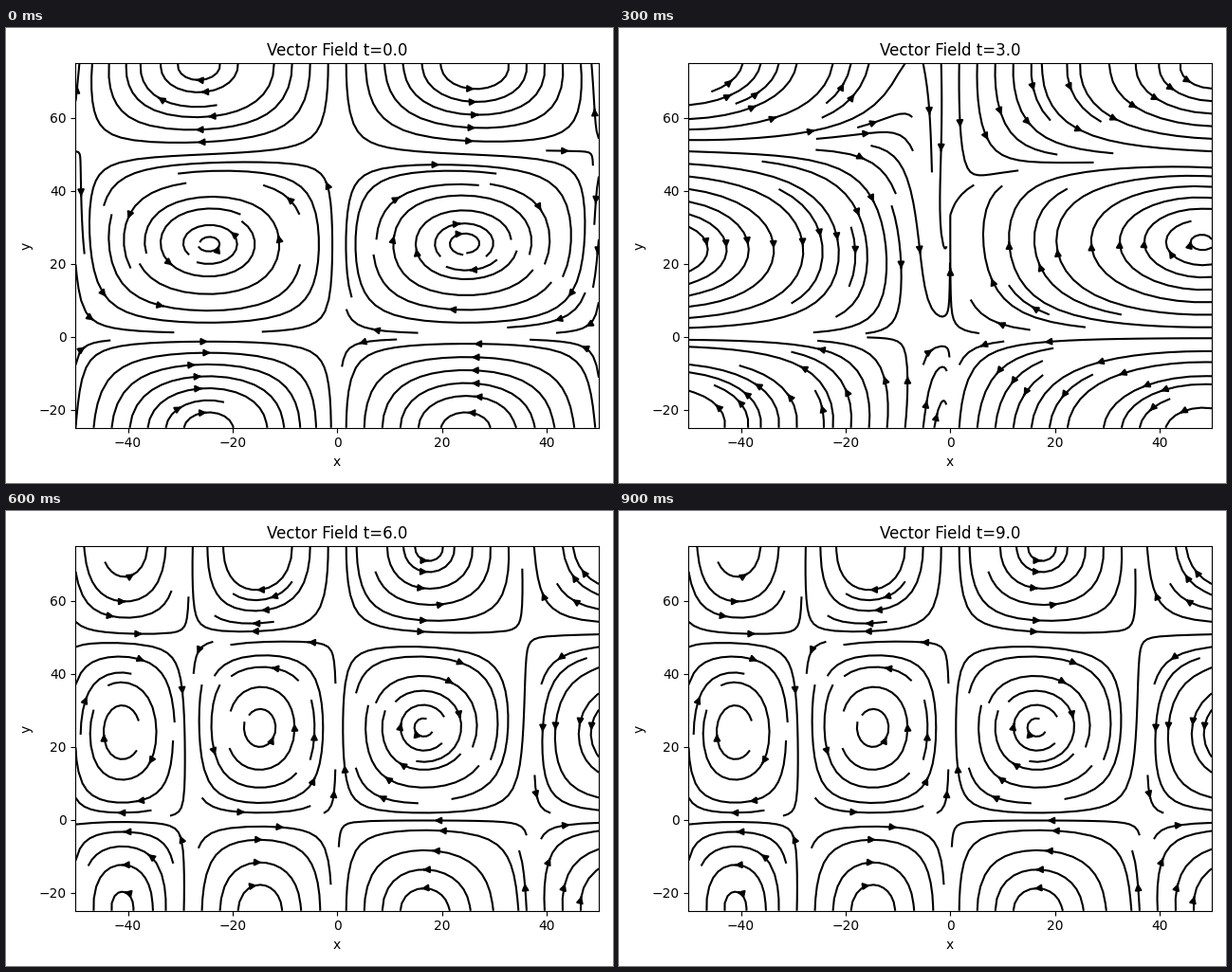
Write a matplotlib script that moves like this. It is 640 by 480 pixels and loops after 1000 ms.

```python
import numpy as np
import matplotlib.pyplot as plt
from matplotlib.animation import FuncAnimation

# Damped, time-periodic double gyre
SIZE = 50.0
AMPLITUDE = 0.5
DAMPING = 0.002
EPSILON = 0.5
PERIOD = 10
FRAMES = 10

X, Y = np.meshgrid(np.linspace(-50, 50, 101), np.linspace(-25, 75, 101))


def velocity(x, y, t):
    sway = EPSILON * np.sin(2 * np.pi * t / PERIOD)
    xs, ys = x / SIZE, np.pi * y / SIZE
    phase = np.pi * (sway * xs**2 + (1 - 2 * sway) * xs)
    slope = 2 * sway * xs + 1 - 2 * sway
    strength = np.pi * AMPLITUDE
    u = -strength * np.sin(phase) * np.cos(ys) - DAMPING * x
    v = strength * np.cos(phase) * np.sin(ys) * slope - DAMPING * y
    return u, v


def decorate(t):
    ax.set(xlim=(-50, 50), ylim=(-25, 75), xlabel="x", ylabel="y",
           title=f"Vector Field t={t:.1f}")


def draw(frame):
    ax.clear()
    u, v = velocity(X, Y, float(frame))
    ax.streamplot(X, Y, u, v, color="k")
    decorate(frame)


plt.rcParams["font.family"] = "DejaVu Sans"
fig, ax = plt.subplots(figsize=(6.4, 4.8), dpi=100)
decorate(0)
fig.tight_layout()

anim = FuncAnimation(fig, draw, frames=FRAMES, init_func=lambda: None,
                     interval=100, repeat=True, repeat_delay=0)
plt.show()
```
